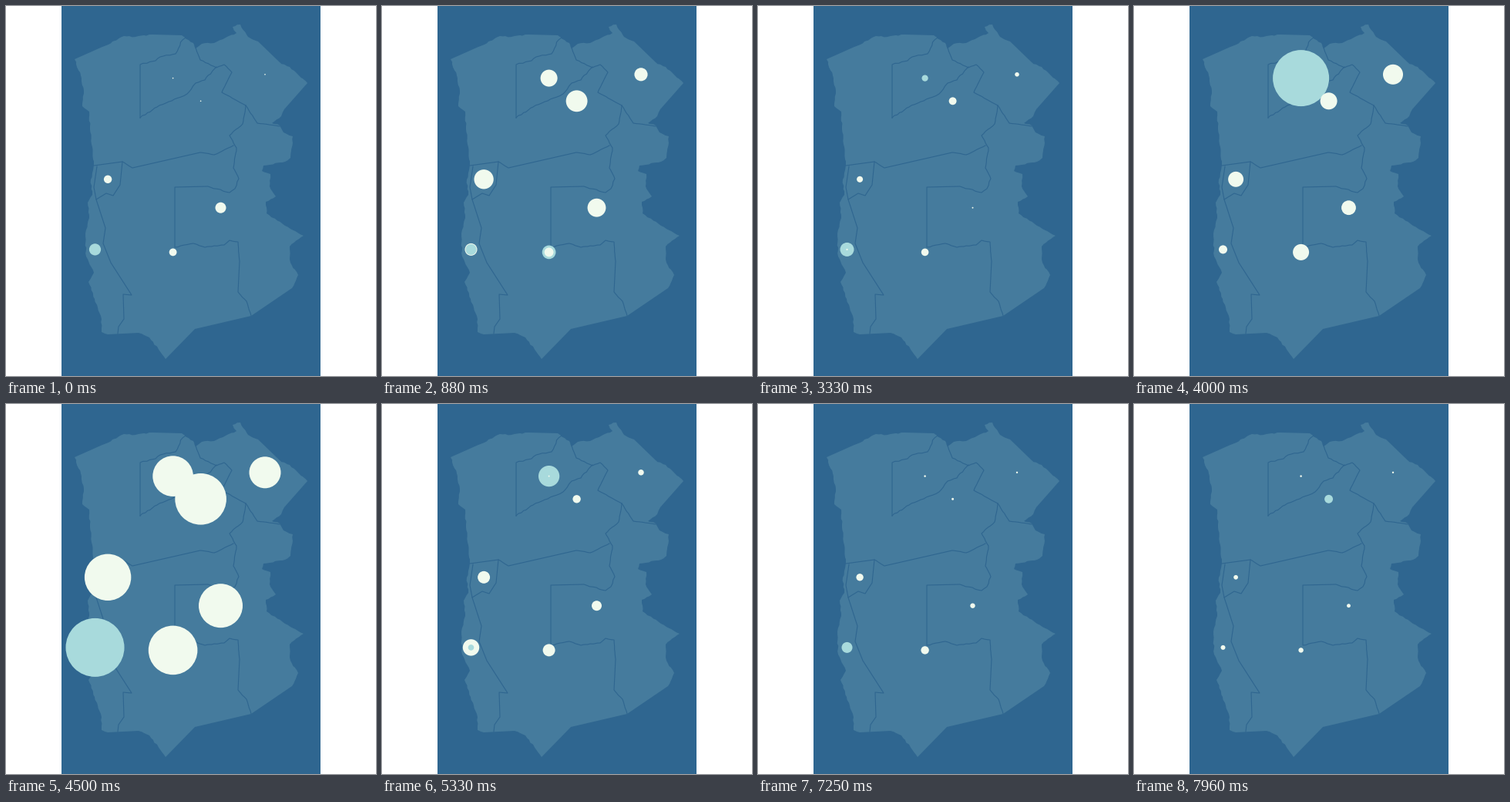
A matplotlib script that plays this animation: 480x480 px, repeating every 8000 ms.

```python
import math
import random

import matplotlib.pyplot as plt
from matplotlib.animation import FuncAnimation
from matplotlib.patches import Circle, Polygon, Rectangle

SIZE, DPI = 480, 100
LOOP, INTERVAL, FPS = 8000, 25, 24
SEA, LAND, CREAM, TEAL = "#2f6690", "#457b9d", "#f1faee", "#a8dadc"
DOT = 0.8  # smallest radius of a bubble

CITIES = [(216.6, 93.6), (252.6, 123.3), (336, 88.8), (132.1, 224.8),
          (278.5, 261.7), (115.5, 315.9), (216.6, 319.4)]
PEAK = [26.3, 33.3, 20.5, 30.2, 28.5, 38, 31.8]


def swell(scale, **special):
    """Radii in proportion to the peak, with exceptions by city letter."""
    return [special.get(c, r * scale) for c, r in zip("abcdefg", PEAK)]


CALM = [0.9, 1.1, DOT, 4.4, 2.9, 6.5, 4.9]

# Bubble radii at each half second; the largest bubble is teal.
RADII = [
    [DOT, DOT, DOT, 5.2, 7, 7.6, 4.9],
    swell(0.62, f=19.3, g=21.5),
    swell(0.29),
    swell(0.29, c=DOT, f=13.7),
    [DOT, DOT, DOT, 2.6, DOT, 7.5, 3.2],
    [1.5, 3, DOT, 6, 7.4, 13.5, 7],
    [1.2, 2.5, DOT, 4, DOT, 14.2, 5],
    [9.3, 8.8, 5.9, 4, 1.2, 1.6, 4.5],
    swell(0.33, a=36.5, c=13, f=5.5),
    PEAK,
    [21.8, 7.2, 5.6, 10.5, 7.8, 17, 10.5],
    [1.2, 2, DOT, 4, 4.4, 8.5, 4],
    CALM,
    swell(0.41),
    CALM,
    swell(0.41, a=8, b=9, d=10, e=9, f=16.5, g=11),
    [0.9, 5.7, DOT, 2.5, 2.1, 3.1, 2.8],
]

NORTH = [(89, 69), (125, 53), (153, 39), (168, 40), (190, 37), (228, 38),
         (243, 48), (246, 55), (254, 49), (270, 48), (299, 35), (294, 27),
         (304, 24), (314, 40), (327, 46), (355, 73), (368, 79), (391, 100)]
EAST = [(361, 134), (357, 143), (345, 152), (355, 155), (360, 164), (372, 169),
        (369, 197), (362, 202), (334, 207), (332, 214), (343, 218), (342, 234),
        (350, 247), (337, 254), (338, 269), (362, 285), (386, 298), (368, 312),
        (369, 333), (379, 349), (371, 366)]
SOUTH = [(318, 402), (245, 419), (207, 458), (186, 430), (172, 424),
         (132, 426)]
WEST = [(124, 423), (123, 402), (115, 380), (107, 358), (114, 346), (104, 325),
        (103, 295), (108, 275), (106, 255), (112, 245), (110, 225), (114, 206),
        (112, 183), (109, 160), (108, 137), (99, 130), (101, 110), (97, 90),
        (89, 69)]

rng = random.Random(5)


def rough(points, amp):
    """Break short segments into small jagged ones; long ones stay straight."""
    out = [points[0]]
    for (x0, y0), (x1, y1) in zip(points, points[1:]):
        length = math.hypot(x1 - x0, y1 - y0)
        parts = max(1, round(length / 4)) if length < 36 else 1
        for i in range(1, parts):
            u = i / parts
            out.append((x0 + (x1 - x0) * u + rng.uniform(-amp, amp),
                        y0 + (y1 - y0) * u + rng.uniform(-amp, amp)))
        out.append((x1, y1))
    return out


fig = plt.figure(figsize=(SIZE / DPI, SIZE / DPI), dpi=DPI, facecolor="white")
ax = fig.add_axes([0, 0, 1, 1])
ax.set_xlim(0, SIZE)
ax.set_ylim(SIZE, 0)
ax.axis("off")


def border(*points, amp=0.0):
    ax.plot(*zip(*rough(points, amp)), color=SEA, lw=0.8, zorder=2)


ax.add_patch(Rectangle((72, 0), 336, SIZE, fc=SEA, lw=0))
ax.add_patch(Polygon(rough(NORTH + EAST + SOUTH + WEST, 0.8), fc=LAND, lw=0))

border((174, 145), (174, 76), (194, 71), (200, 66), (220, 62), (229, 44),
       (233, 41), amp=0.8)
border((174, 145), (196, 131), (215, 123), (235, 114), (246, 100), (258, 96),
       (273, 79), amp=0.8)
border((245, 52), (252, 70), (273, 80), (283, 76), (293, 86), (280, 112),
       (311, 129), (326, 152), (355, 156), amp=0.3)
border((311, 129), (307, 153), (290, 168), (299, 184), (295, 210), (302, 224),
       (297, 237), (290, 242), (262, 234), (219, 235), (219, 313), (243, 308),
       (258, 313), (283, 310), (290, 304), (301, 306), (303, 331), (301, 371),
       (312, 383), (318, 402), amp=0.6)
border((114, 207), (151, 202), (164, 210), (252, 190), (270, 193), (295, 181),
       amp=0.4)
border((118, 208), (114, 235), (117, 251), (130, 243), (139, 246), (148, 232),
       (151, 202))
border((117, 251), (129, 288), (126, 308), (136, 333), (163, 375), (152, 374),
       (153, 406), (146, 416), (145, 425))


def bubbles(z):
    return [ax.add_patch(Circle(c, DOT, lw=0, zorder=z)) for c in CITIES]


base, entering = bubbles(3), bubbles(4)


def mix(a, b, p):
    return a + (b - a) * p


def progress(t):
    """Index of the current state and eased share of the way to the next."""
    tick = int((t + 10) * FPS / 1000)
    state = max(0, (tick - 1) // 12)
    steps = 7 if state else 8
    step = max(0, tick - 12 * state - 12 + steps)
    return state, (1 - math.cos(math.pi * step / steps)) / 2


def draw(i):
    state, p = progress(i * INTERVAL)
    old, new = RADII[state], RADII[state + 1]
    for a, b, under, over in zip(old, new, base, entering):
        was_top, is_top = a == max(old), b == max(new)
        swap = was_top != is_top and p > 0
        under.set_facecolor(TEAL if was_top else CREAM)
        under.set_radius(mix(a, DOT if swap else b, p))
        over.set_visible(swap)
        over.set_facecolor(TEAL if is_top else CREAM)
        over.set_radius(mix(DOT, b, p))
    return base + entering


anim = FuncAnimation(fig, draw, frames=LOOP // INTERVAL, interval=INTERVAL,
                     repeat=True, repeat_delay=0, blit=False)
plt.show()
```
